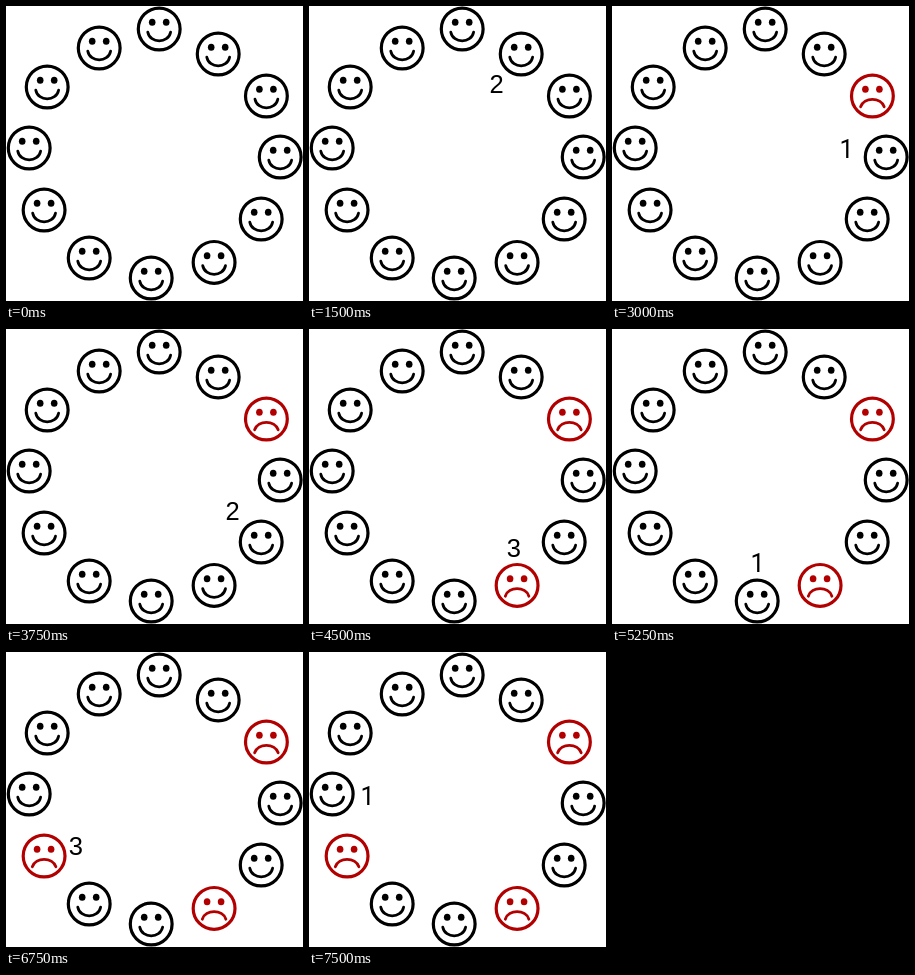
Recreate the animation shown at these times as an HTML page. Size 297 by 295 pixels, loop 8000 ms.

```html
<!DOCTYPE html>
<html lang="en">
<head>
<meta charset="utf-8">
<title>Counting out in a circle</title>
<style>
  html, body { margin: 0; width: 100%; height: 100%; overflow: hidden; background: #fff; }
  svg { display: block; width: 297px; height: 295px; }
  .face { color: #000; }
  .face.out { color: #b20000; }
  .line { fill: none; stroke: currentColor; stroke-width: 2.8; stroke-linecap: round; }
  .rim { stroke-width: 3.2; }
  .eye { fill: currentColor; }
  .sad, .out .happy { display: none; }
  .out .sad { display: inline; }
  text { font: 25.5px "Liberation Sans", Arial, sans-serif; text-anchor: middle; }
  text.one { font: 25px Roboto, sans-serif; }
</style>
</head>
<body>
<svg id="stage" viewBox="0 0 297 295">
  <defs>
    <g id="head">
      <circle class="line rim" r="20.9"/>
      <ellipse class="eye" cx="-7" cy="-6.7" rx="3.3" ry="3.5"/>
      <ellipse class="eye" cx="7" cy="-6.7" rx="3.3" ry="3.5"/>
    </g>
    <path id="smile" class="line" d="M-11.4 3.2C-9 14.8 9 14.8 11.4 3.2"/>
    <path id="frown" class="line" d="M-11.8 10.8C-8.5 .8 8.5 .8 11.8 10.8"/>
  </defs>
  <text id="count"></text>
</svg>
<script>
const STEP = 750, LOOP = 8000;

// Face centres, clockwise from the top
const seats = [
  [153.2, 23], [212.2, 48], [260.4, 90], [274.2, 151], [255.2, 213], [208.1, 256.4],
  [145.2, 272], [83.2, 252], [38.1, 204], [23.2, 142], [41.2, 81], [93.2, 42]
];

// Baseline centre of the spoken number beside each seat
const labels = [
  [153.6, 70], [187.5, 87], [227.3, 115.5], [234.6, 152], [226.5, 191],
  [204.8, 227.5], [145.6, 243], [100.5, 228], [69.8, 202.6], [58.6, 153]
];

const stage = document.getElementById("stage");
const count = document.getElementById("count");

const faces = seats.map(([x, y]) => {
  const face = document.createElementNS("http://www.w3.org/2000/svg", "g");
  face.setAttribute("transform", `translate(${x} ${y})`);
  face.innerHTML = '<use href="#head"/><use class="happy" href="#smile"/><use class="sad" href="#frown"/>';
  stage.insertBefore(face, count);
  return face;
});

function show(time) {
  const current = Math.floor(time / STEP) - 1;
  faces.forEach((face, i) => {
    const out = i % 3 === 2 && i <= current;
    face.setAttribute("class", out ? "face out" : "face");
  });
  if (current < 0) {
    count.textContent = "";
    return;
  }
  const number = current % 3 + 1;
  const [x, y] = labels[current];
  count.setAttribute("class", number === 1 ? "one" : "");
  count.setAttribute("x", x);
  count.setAttribute("y", y);
  count.textContent = number;
}

const start = performance.now();
function tick() {
  show((performance.now() - start) % LOOP);
  requestAnimationFrame(tick);
}
tick();
</script>
</body>
</html>
```
